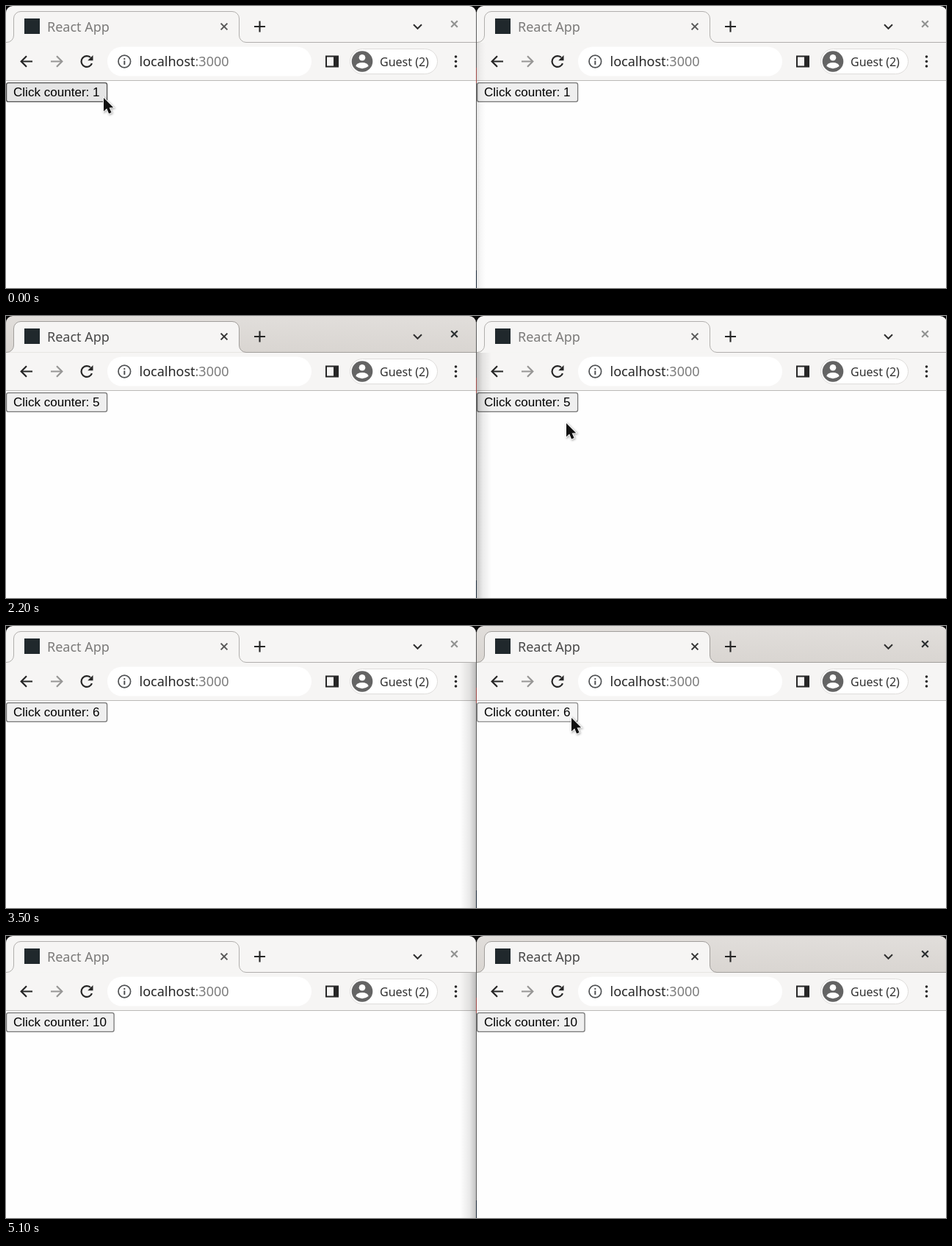
Write an HTML page with a canvas that moves like this. It is 1280x384 px and loops after 5.2 s.

```html
<!DOCTYPE html>
<html lang="en">
<head>
<meta charset="utf-8">
<title>Click counter</title>
<style>
html, body { margin: 0; width: 100%; height: 100%; overflow: hidden; background: #000; }
canvas { display: block; }
</style>
</head>
<body>
<canvas id="stage" width="1280" height="384"></canvas>
<script>
const ctx = document.getElementById('stage').getContext('2d');
const LOOP = 5200, STEP = 100, PRESS = 100;
const RIGHT_X = 641;
const UI_FONT = '"Noto Sans", "Open Sans", sans-serif';
const BUTTON_FONT = '17.07px "Liberation Sans", Arial, sans-serif';
const CHROME = '#f6f5f4', INK = '#262626';

const presses = [500, 800, 1200, 1500, 3100, 3500, 3800, 4200, 4700];
// time, x, y of the pointer tip
const path = [
  [0, 133, 125], [1800, 133, 125], [1900, 150, 130], [2000, 340, 148], [2100, 590, 150],
  [2200, 763, 146], [2300, 801, 142], [2400, 801, 142], [2900, 770, 125],
  [4800, 770, 125], [4900, 880, 180], [5000, 1160, 303], [5100, 1400, 410], [5200, 1400, 410]
];
const buttonStyles = {
  normal: ['#efefef', '#767676'],
  hover: ['#e5e5e5', '#4f4f4f'],
  pressed: ['#f5f5f5', '#8d8d8d']
};

function pointerAt(t) {
  const i = path.findIndex(p => p[0] > t);
  const [t0, x0, y0] = path[i - 1], [t1, x1, y1] = path[i];
  const k = (t - t0) / (t1 - t0);
  return { x: x0 + (x1 - x0) * k, y: y0 + (y1 - y0) * k };
}

function line(points, color, width) {
  ctx.beginPath();
  points.forEach(([x, y], i) => i ? ctx.lineTo(x, y) : ctx.moveTo(x, y));
  ctx.strokeStyle = color;
  ctx.lineWidth = width;
  ctx.stroke();
}

function rect(x, y, w, h, color) {
  ctx.fillStyle = color;
  ctx.fillRect(x, y, w, h);
}

function round(x, y, w, h, r, fill, stroke, width = 1) {
  ctx.beginPath();
  ctx.roundRect(x, y, w, h, r);
  ctx.fillStyle = fill;
  ctx.fill();
  if (!stroke) return;
  ctx.strokeStyle = stroke;
  ctx.lineWidth = width;
  ctx.stroke();
}

function dot(x, y, r, color) {
  ctx.beginPath();
  ctx.arc(x, y, r, 0, Math.PI * 2);
  ctx.fillStyle = color;
  ctx.fill();
}

function cross(x, y, r, color, width) {
  line([[x - r, y - r], [x + r, y + r]], color, width);
  line([[x + r, y - r], [x - r, y + r]], color, width);
}

function text(str, x, y, font, color) {
  ctx.font = font;
  ctx.fillStyle = color;
  ctx.fillText(str, x, y);
}

function arrow(x, dir, color) {
  const y = 75.5;
  line([[x - 8 * dir, y], [x + 7 * dir, y]], color, 2.2);
  line([[x, y - 7.3], [x + 7.3 * dir, y], [x, y + 7.3]], color, 2.2);
}

function tabStrip(active) {
  let frame = CHROME;
  if (active) {
    frame = ctx.createLinearGradient(0, 0, 0, 50);
    frame.addColorStop(0, '#e1dedb');
    frame.addColorStop(1, '#d9d5d1');
  }
  rect(0, 0, 640, 50, frame);

  ctx.beginPath();
  ctx.moveTo(-2, 49.5);
  ctx.lineTo(1, 49.5);
  ctx.arcTo(10.5, 49.5, 10.5, 40, 9.5);
  ctx.arcTo(10.5, 7.5, 20, 7.5, 9.5);
  ctx.arcTo(317.5, 7.5, 317.5, 17, 9.5);
  ctx.arcTo(317.5, 49.5, 327, 49.5, 9.5);
  ctx.lineTo(642, 49.5);
  ctx.fillStyle = CHROME;
  ctx.fill();
  ctx.strokeStyle = active ? '#a19e9b' : '#b1afad';
  ctx.lineWidth = 1;
  ctx.stroke();

  round(25, 17, 21, 21, 0, '#20282c');
  text('React App', 56, 34.5, '18px ' + UI_FONT, active ? '#484848' : '#7b7a79');
  cross(297, 28, 4.4, active ? '#333' : '#575757', 2);
  line([[338, 28], [353, 28]], INK, 2.1);
  line([[345.5, 20.5], [345.5, 35.5]], INK, 2.1);
  line([[555, 25.2], [560.5, 30.7], [566, 25.2]], '#333', 2.1);
  cross(610.5, 24.5, 4.3, active ? '#2b2f31' : '#929392', 2.2);
}

function toolbar() {
  rect(0, 50, 640, 52, CHROME);
  rect(0, 101, 640, 1, '#bbb9b7');
  arrow(28, -1, INK);
  arrow(69, 1, '#979695');

  ctx.beginPath();
  ctx.arc(110, 75.5, 7.4, 0.35, 5.45);
  ctx.strokeStyle = INK;
  ctx.lineWidth = 2.2;
  ctx.stroke();
  ctx.beginPath();
  ctx.moveTo(118.5, 67);
  ctx.lineTo(118.5, 74.3);
  ctx.lineTo(111.2, 74.3);
  ctx.fillStyle = INK;
  ctx.fill();

  round(138, 55.5, 278, 40, 20, '#fff');
  ctx.beginPath();
  ctx.arc(161.3, 75.5, 8.3, 0, Math.PI * 2);
  ctx.strokeStyle = '#505254';
  ctx.lineWidth = 1.7;
  ctx.stroke();
  rect(160.3, 71, 2, 2, '#505254');
  rect(160.3, 74.5, 2, 5.5, '#505254');
  const font = '18px ' + UI_FONT;
  text('localhost', 181.5, 82, font, '#262626');
  text(':3000', 181.5 + ctx.measureText('localhost').width, 82, font, '#7a7a7a');

  ctx.strokeStyle = INK;
  ctx.lineWidth = 2;
  ctx.strokeRect(436, 68.5, 16, 14);
  rect(446, 68, 6.5, 15, INK);

  round(468.5, 58.5, 119, 34, 17, '#fff', '#dfdddb');
  ctx.save();
  ctx.beginPath();
  ctx.arc(485, 75.5, 14.3, 0, Math.PI * 2);
  ctx.fillStyle = '#646464';
  ctx.fill();
  ctx.clip();
  dot(485, 70.3, 4.3, '#fff');
  ctx.beginPath();
  ctx.ellipse(485, 82, 8.6, 5, 0, Math.PI, Math.PI * 2);
  ctx.quadraticCurveTo(485, 88.5, 476.4, 82);
  ctx.fill();
  ctx.restore();
  text('Guest (2)', 509, 81.5, '16px ' + UI_FONT, '#303030');
  [69, 75.5, 82].forEach(y => dot(612.5, y, 1.8, INK));
}

function browser(x, active, count, state) {
  ctx.save();
  ctx.translate(x, 0);
  ctx.beginPath();
  ctx.roundRect(0, 0, 640, 400, [9, 9, 0, 0]);
  ctx.clip();
  rect(0, 102, 640, 282, '#fefefe');
  tabStrip(active);
  toolbar();

  const label = 'Click counter: ' + count;
  const [fill, edge] = buttonStyles[state];
  ctx.font = BUTTON_FONT;
  const width = ctx.measureText(label).width + 19.4;
  round(0.6, 104.6, width, 25.8, 2.6, fill, edge, 1.28);
  text(label, 10, 123, BUTTON_FONT, '#000');
  ctx.restore();
}

// Shade cast by the front window, fading from x0 to x1
function shade(x0, x1, alpha) {
  const g = ctx.createLinearGradient(x0, 0, x1, 0);
  g.addColorStop(0, `rgba(0,0,0,${alpha})`);
  g.addColorStop(0.4, `rgba(0,0,0,${alpha * 0.35})`);
  g.addColorStop(1, 'rgba(0,0,0,0)');
  rect(Math.min(x0, x1), 50, Math.abs(x1 - x0), 334, g);
}

function seam() {
  rect(640, 8, 1, 376, '#5c5c5c');
  rect(640, 84, 1, 21, '#a04a48');
  rect(640, 360, 1, 24, '#1c2b3a');
}

function pointer({ x, y }) {
  const shape = [[0, 0], [0, 18.4], [4.2, 14.6], [7.1, 21.6], [10.6, 20.1], [7.6, 13.4], [13.2, 13.2]];
  ctx.save();
  ctx.translate(x, y);
  ctx.beginPath();
  shape.forEach(p => ctx.lineTo(...p));
  ctx.closePath();
  ctx.shadowColor = 'rgba(0,0,0,.4)';
  ctx.shadowBlur = 3;
  ctx.shadowOffsetX = ctx.shadowOffsetY = 1;
  ctx.strokeStyle = '#fff';
  ctx.lineWidth = 1.8;
  ctx.stroke();
  ctx.shadowColor = 'transparent';
  ctx.fillStyle = '#111';
  ctx.fill();
  ctx.restore();
}

function draw(t) {
  const tip = pointerAt(t);
  const count = 1 + presses.filter(p => t >= p + PRESS).length;
  const held = presses.some(p => t >= p && t < p + PRESS);
  const front = t < presses[0] ? '' : t < presses[4] ? 'left' : 'right';
  const stateAt = x => {
    const over = tip.x >= x && tip.x < x + 138 && tip.y >= 104 && tip.y < 131;
    return over ? (held ? 'pressed' : 'hover') : 'normal';
  };

  rect(0, 0, 1280, 384, '#080808');
  browser(0, front === 'left', count, stateAt(0));
  browser(RIGHT_X, front === 'right', count, stateAt(RIGHT_X));
  if (front === 'right') shade(640, 618, 0.24);
  else if (front === 'left') shade(641, 661, 0.22);
  else shade(641, 653, 0.1);
  seam();
  pointer(tip);
}

function tick() {
  const t = performance.now() % LOOP;
  draw(Math.floor(t / STEP) * STEP);
  requestAnimationFrame(tick);
}
tick();
</script>
</body>
</html>
```
